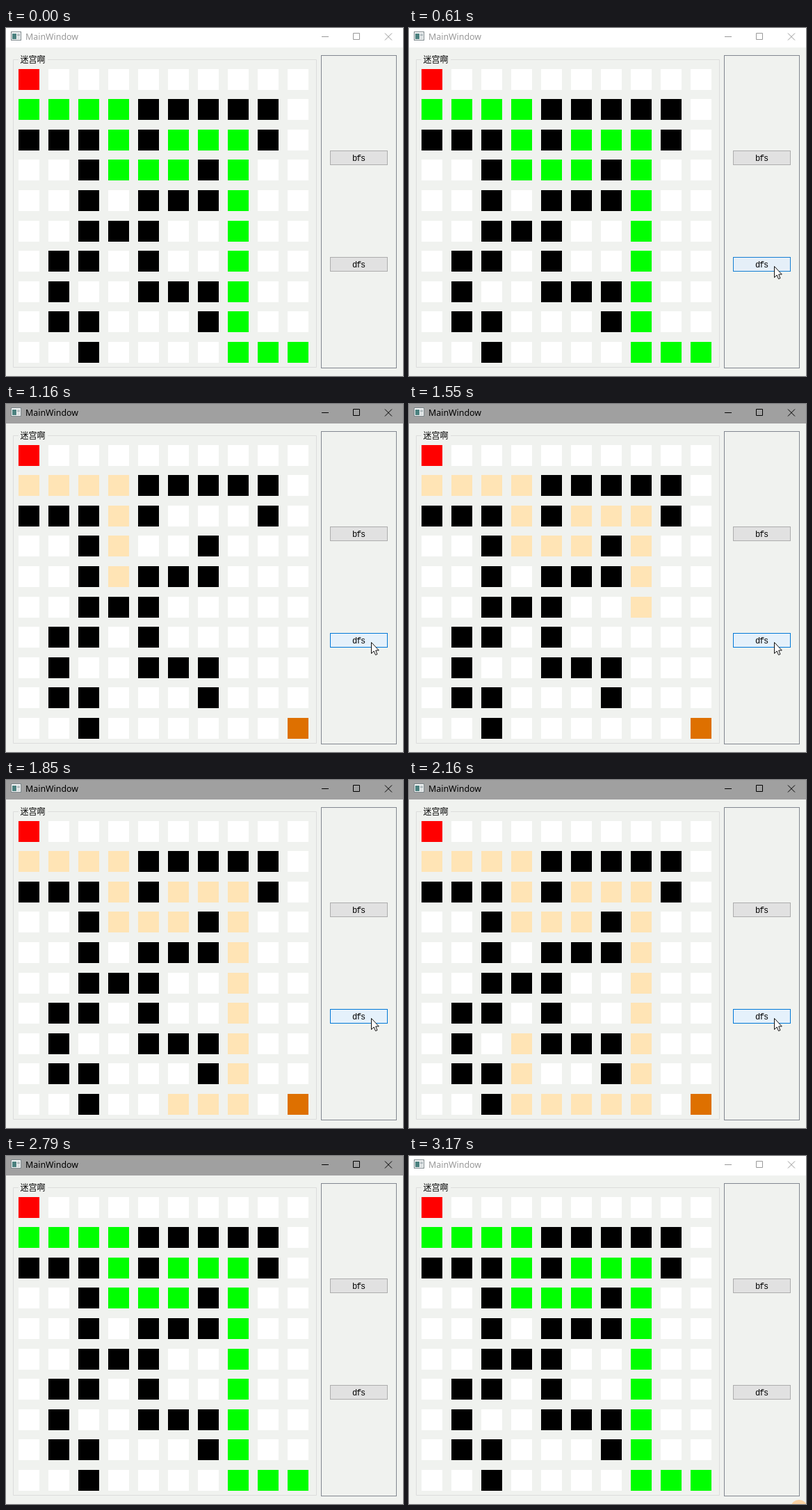
Write an HTML page that moves like this. It is 571 px wide and 500 px high and loops after 3250 ms.

```html
<!DOCTYPE html>
<html lang="zh">
<head>
<meta charset="utf-8">
<title>MainWindow</title>
<style>
  html, body { margin: 0; width: 100%; height: 100%; overflow: hidden; background: #f0f2ef; }
  svg { display: block; width: 571px; height: 500px; }
  #bar { fill: #fff; }
  #bar + g { fill: #999; stroke: #999; }
  .active #bar { fill: #a0a0a0; }
  .active #bar + g { fill: #000; stroke: #000; }
  .title { font: 12.4px "Noto Sans", "Open Sans", sans-serif; stroke: none; }
  .group { font: 12px "Noto Sans CJK SC", "Noto Sans CJK", sans-serif; }
  .label { font: 12px "Liberation Mono", monospace; letter-spacing: -1.2px; }
  .button { fill: #e1e1e1; stroke: #adadad; }
</style>
</head>
<body>
<svg id="win" viewBox="0 0 571 500">
  <rect width="571" height="500" fill="#f0f2ef"/>
  <rect id="bar" width="571" height="28"/>
  <g>
    <text class="title" x="28" y="17">MainWindow</text>
    <path fill="none" d="M454 12.5h10M499.5 7.5h9v9h-9zM545 7.5l10 10M555 7.5l-10 10"/>
  </g>
  <g id="icon">
    <rect x="7.5" y="5.5" width="14" height="12" fill="#f6f8f8" stroke="#7d878b"/>
    <rect x="9" y="8" width="6" height="8" fill="#4c817f"/>
    <rect x="16" y="8" width="4" height="4" fill="#b9c3c6"/>
    <rect x="16" y="13" width="4" height="3" fill="#d5dbdd"/>
  </g>
  <path d="M18 45.5H10.5V487.5H446.5V45.5H60" fill="none" stroke="#dcdddc"/>
  <text class="group" x="20.5" y="49.5">迷宫啊</text>
  <rect x="453.500" y="39.5" width="108" height="449" fill="none" stroke="#828790"/>
  <rect class="button" x="466.5" y="176.5" width="82" height="20"/>
  <text class="label" x="498" y="191">bfs</text>
  <rect class="button" id="dfs" x="466.5" y="329.5" width="82" height="20"/>
  <text class="label" x="498" y="344">dfs</text>
  <g id="cells"></g>
  <path id="cursor" d="M.5 .5V16.5L4.2 13 6.5 18.5 9 17.5 6.7 12H11.3Z" fill="#fff"/>
  <ellipse id="ripple" cx="561" cy="503" rx="11" ry="9" fill="#fad3a4"/>
</svg>
<script>
const LOOP = 3250;
const TICKS = [0, 70, 150, 230, 310, 390, 470, 550, 610, 780, 860, 930, 1010, 1090, 1170, 1240,
  1320, 1400, 1470, 1550, 1630, 1710, 1780, 1850, 1930, 2010, 2080, 2160, 2240, 2320,
  2390, 2470, 2550, 2630, 2710, 2790, 3170];
const PRESS = 780, SEARCH = 930, FOUND = 2390, BLUR = 3170;
const SEARCH_BASE = 712, STEP = 53.6;

const MAZE = [
  '..........',
  '....#####.',
  '###.#...#.',
  '..#...#...',
  '..#.###...',
  '..###.....',
  '.##.#.....',
  '.#..###...',
  '.##...#...',
  '..#.......'
];
const DIRS = [[1, 0], [0, -1], [0, 1], [-1, 0]];
const COLORS = { wall: '#000', free: '#fff', start: '#f00', goal: '#de7000', seen: '#ffe4b5', path: '#0f0' };
const NORMAL = [[225, 225, 225], [173, 173, 173]];
const HOVER = [[229, 241, 251], [0, 120, 215]];
const DOWN = [[204, 228, 247], [0, 84, 153]];

const $ = id => document.getElementById(id);
const clamp = p => Math.max(0, Math.min(1, p));
const lerp = (a, b, p) => a + (b - a) * p;
const rgb = (a, b, p) => `rgb(${a.map((v, i) => Math.round(lerp(v, b[i], p)))})`;

const cells = MAZE.map((row, r) => [...row].map((ch, c) => {
  const el = document.createElementNS('http://www.w3.org/2000/svg', 'rect');
  const attrs = { x: 18 + 43 * c, y: Math.round(58.8 + 43.55 * r), width: 30, height: 30 };
  for (const k in attrs) el.setAttribute(k, attrs[k]);
  $('cells').append(el);
  return el;
}));

// Depth-first search; each entry is the stack of cells on entering a new one.
function search() {
  const stacks = [], visited = new Set();
  const visit = (r, c, stack) => {
    if (MAZE[r]?.[c] !== '.' || visited.has(r * 10 + c)) return false;
    visited.add(r * 10 + c);
    const next = [...stack, [r, c]];
    stacks.push(next);
    return r === 9 && c === 9 || DIRS.some(([dr, dc]) => visit(r + dr, c + dc, next));
  };
  visit(0, 0, []);
  return stacks;
}
const stacks = search();
const route = stacks[stacks.length - 1];

function paintCells(t) {
  const paint = ([r, c], kind) => cells[r][c].setAttribute('fill', COLORS[kind]);
  MAZE.forEach((row, r) => [...row].forEach((ch, c) => paint([r, c], ch === '#' ? 'wall' : 'free')));
  if (t > PRESS && t < SEARCH) return;
  if (t <= PRESS || t >= FOUND) {
    route.forEach(p => paint(p, 'path'));
  } else {
    const k = Math.min(stacks.length - 2, Math.floor((t - SEARCH_BASE) / STEP));
    stacks[k].forEach(p => paint(p, 'seen'));
    paint([9, 9], 'goal');
  }
  paint([0, 0], 'start');
}

function cursorAt(t) {
  if (t < 70 || t >= 2790) return null;
  if (t < 610) {
    const q = (1 - (t - 70) / 540) ** 2;
    return [lerp(525, 543, q), lerp(342, 441, q)];
  }
  if (t < 2320) return [525, 342];
  if (t < FOUND) return [540, 373];
  const p = (t - FOUND) / 320;
  return [lerp(547, 558, p), lerp(403, 488, p)];
}

function paintButton(t) {
  let from = NORMAL, to = HOVER, p;
  if (t >= PRESS && t < 2240) {
    from = DOWN;
    p = clamp((t - PRESS) / 140);
  } else {
    p = t < PRESS ? clamp((t - 460) / 170) : clamp((2415 - t) / 120);
  }
  $('dfs').style.fill = rgb(from[0], to[0], p);
  $('dfs').style.stroke = rgb(from[1], to[1], p);
}

function draw(t) {
  $('win').classList.toggle('active', t >= PRESS && t < BLUR);
  paintCells(t);
  paintButton(t);
  const pos = cursorAt(t);
  $('cursor').style.display = pos ? '' : 'none';
  if (pos) $('cursor').setAttribute('transform', `translate(${pos.map(Math.round)})`);
  $('cursor').setAttribute('stroke', t < FOUND ? '#111' : '#2f9a5a');
  $('ripple').style.display = t >= BLUR ? '' : 'none';
}

let shown = -1;
const origin = performance.now();
function loop() {
  const now = (performance.now() - origin) % LOOP;
  const tick = TICKS.filter(t => t <= now).pop();
  if (tick !== shown) draw(shown = tick);
  requestAnimationFrame(loop);
}
draw(0);
loop();
</script>
</body>
</html>
```
